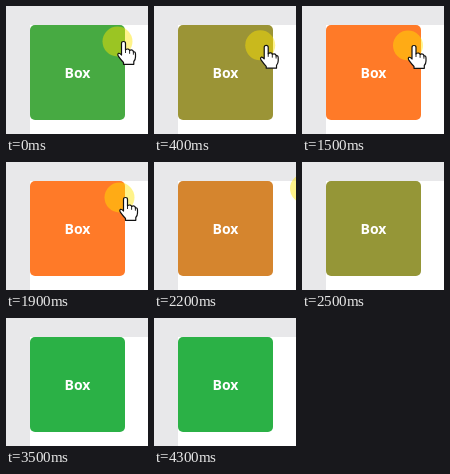
An HTML page with a canvas that plays this animation: 142 px wide and 128 px high, repeating every 4400 ms.

```html
<!DOCTYPE html>
<html lang="en">
<head>
<meta charset="utf-8">
<title>Box hover transition</title>
<style>
  html, body { margin: 0; width: 100%; height: 100%; overflow: hidden; background: #e8e8ea; }
  canvas { display: block; width: 142px; height: 128px; }
</style>
</head>
<body>
<canvas id="stage"></canvas>
<script>
const WIDTH = 142, HEIGHT = 128, LOOP = 4400, STEP = 100;
const GREEN = [43, 177, 70], ORANGE = [255, 122, 40];

const canvas = document.getElementById('stage');
const ctx = canvas.getContext('2d');
const scale = window.devicePixelRatio || 1;
canvas.width = WIDTH * scale;
canvas.height = HEIGHT * scale;
ctx.scale(scale, scale);

const clamp = v => Math.min(1, Math.max(0, v));
const progress = (t, start, end) => clamp((t - start) / (end - start));
const lerp = (a, b, k) => a + (b - a) * k;
const easeOut = k => 1 - (1 - k) ** 2;

const hand = new Path2D(
  'M-2 2 Q-2 0 0 0 Q2 0 2 2 V8.5 Q3 7.2 4.7 7.6 Q6 7.9 6.1 9 ' +
  'Q7.6 8 9 8.8 Q9.8 9.3 9.9 10.5 Q12 9.8 12 12.4 V15.5 ' +
  'Q12 18 10.3 20 V22.8 H0 V21 Q-2.8 18 -5 14.8 Q-6.4 12.7 -4.9 11.8 ' +
  'Q-3.6 11.5 -2 13.5 Z'
);
const fingers = new Path2D('M2 8 V11.5 M6.1 9 V12.3 M9.9 10.5 V13.2');

// Linear one-second fades; the pointer is already over the box as the loop begins.
function hoverAmount(t) {
  return t < 2000 ? progress(t, -130, 870) : 1 - progress(t, 2000, 3000);
}

function pointerAt(t) {
  const enter = easeOut(progress(t, 0, 500));
  const approach = progress(t, 1600, 1900) ** 2;
  const leave = progress(t, 1900, 2300);
  return {
    x: lerp(117.5, 112, enter) + 7.5 * approach + 50 * leave,
    y: lerp(35.5, 39.5, enter) - 4 * approach - 12 * leave
  };
}

function drawBox(t) {
  const amount = hoverAmount(t);
  const color = GREEN.map((c, i) => Math.round(lerp(c, ORANGE[i], amount)));
  ctx.fillStyle = `rgb(${color})`;
  ctx.beginPath();
  ctx.roundRect(24, 19, 95, 95, 5);
  ctx.fill();
  ctx.fillStyle = '#fff';
  ctx.font = 'bold 14px "Open Sans", sans-serif';
  ctx.textAlign = 'center';
  ctx.fillText('Box', 71.5, 72);
}

function drawPointer(t) {
  const { x, y } = pointerAt(t);
  ctx.save();
  ctx.translate(x, y);
  ctx.fillStyle = 'rgba(255, 228, 0, 0.46)';
  ctx.beginPath();
  ctx.arc(-6, 0, 15, 0, Math.PI * 2);
  ctx.fill();
  ctx.fillStyle = '#fff';
  ctx.strokeStyle = '#111';
  ctx.lineWidth = 1.2;
  ctx.lineJoin = 'round';
  ctx.fill(hand);
  ctx.stroke(hand);
  ctx.lineWidth = 0.9;
  ctx.stroke(fingers);
  ctx.restore();
}

function draw(t) {
  ctx.fillStyle = '#e8e8ea';
  ctx.fillRect(0, 0, WIDTH, HEIGHT);
  ctx.fillStyle = '#fff';
  ctx.fillRect(24, 19, WIDTH - 24, HEIGHT - 19);
  drawBox(t);
  if (t < 2400) drawPointer(t);
}

const began = performance.now();
function tick() {
  const elapsed = (performance.now() - began) % LOOP;
  draw(Math.floor(elapsed / STEP) * STEP);
  requestAnimationFrame(tick);
}
tick();
</script>
</body>
</html>
```
